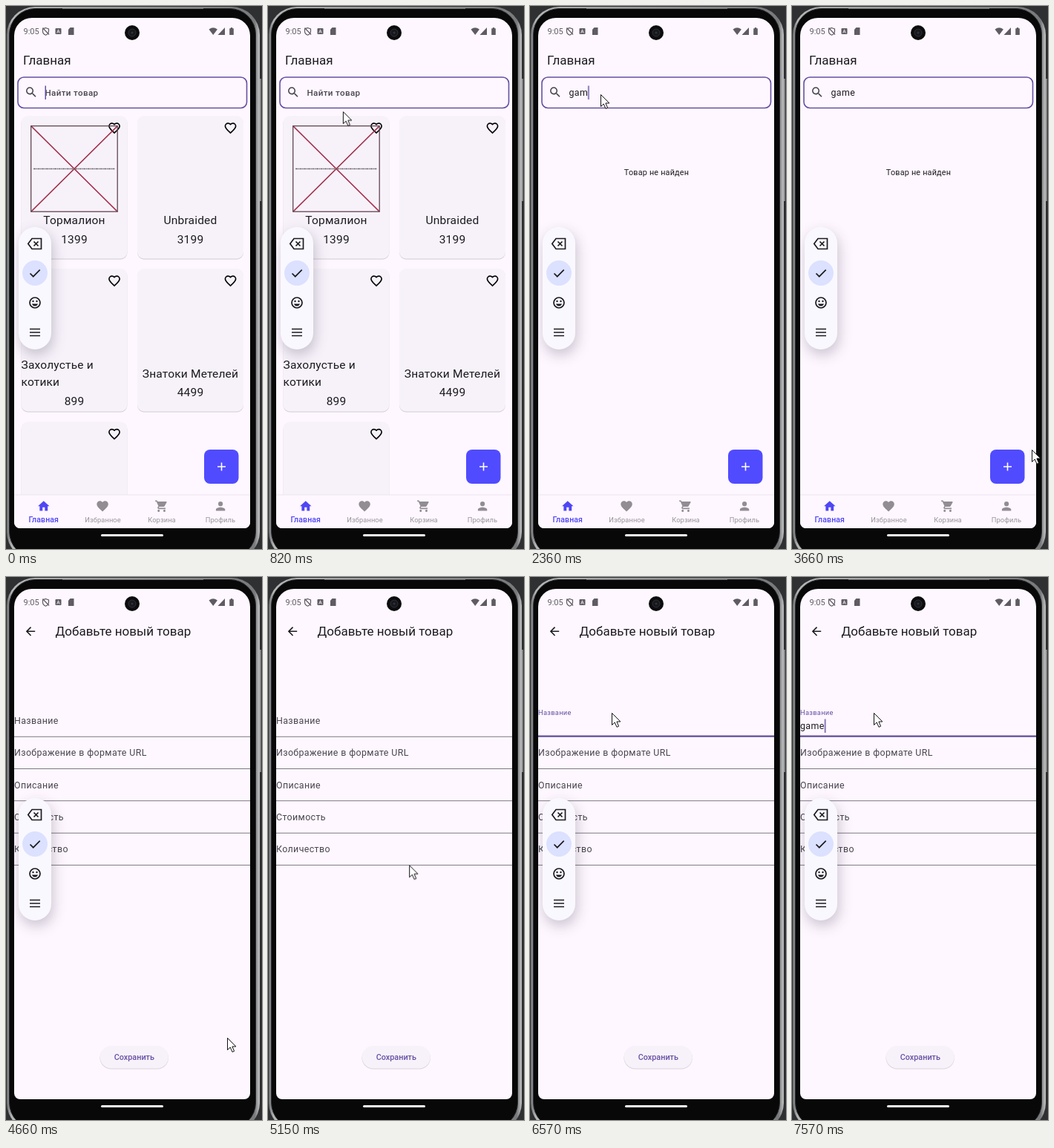
An HTML page that plays this animation: 345x732 px, repeating every 8000 ms.

```html
<!DOCTYPE html>
<html lang="ru">
<head>
<meta charset="utf-8">
<title>Главная</title>
<style>
html, body { margin: 0; width: 100%; height: 100%; overflow: hidden; background: #2b2b2c; }
svg { display: block; width: 100%; height: 100%; }
text { font-family: Roboto, sans-serif; fill: #1d1b20; }
.mid { text-anchor: middle; }
.title { font-size: 17px; }
.card { font-size: 15.5px; letter-spacing: .19px; }
.body { font-size: 12.4px; letter-spacing: .39px; }
.label { fill: #49454f; }
.hint { font-size: 11.6px; font-weight: 500; letter-spacing: .35px; fill: #49454f; }
.note { font-size: 10.84px; letter-spacing: .19px; }
.nav { font-size: 9.3px; letter-spacing: .1px; fill: #98949a; }
.nav.on { font-size: 10.5px; font-weight: 500; fill: #4f46f5; }
.button { font-size: 10.84px; font-weight: 500; fill: #6750a4; }
.line { fill: none; stroke: #1b1b1f; stroke-width: 1.7; }

/* Every track lasts 8 s: 1% = 80 ms */
.step, .step-text tspan { animation: 8s step-end infinite; }
.move { animation: 8s linear infinite; }

.page-list { animation-name: page-list; }
.page-form { animation-name: page-form; }
@keyframes page-list { 0% { opacity: 1 } 58.25%, 100% { opacity: 0 } }
@keyframes page-form { 0% { opacity: 0 } 58.25%, 100% { opacity: 1 } }

.hint { animation-name: hint; }
.goods { animation-name: goods; }
.empty { animation-name: empty; }
@keyframes hint { 0% { opacity: 1 } 26.125%, 100% { opacity: 0 } }
@keyframes goods { 0% { opacity: 1 } 27%, 100% { opacity: 0 } }
@keyframes empty { 0% { opacity: 0 } 27%, 100% { opacity: 1 } }

.query tspan:nth-child(1) { animation-name: q1; }
.query tspan:nth-child(2) { animation-name: q2; }
.query tspan:nth-child(3) { animation-name: q3; }
.query tspan:nth-child(4) { animation-name: q4; }
@keyframes q1 { 0% { fill: transparent } 26.125%, 100% { fill: #1d1b20 } }
@keyframes q2 { 0% { fill: transparent } 27.875%, 100% { fill: #1d1b20 } }
@keyframes q3 { 0% { fill: transparent } 29.5%, 100% { fill: #1d1b20 } }
@keyframes q4 { 0% { fill: transparent } 34.5%, 100% { fill: #1d1b20 } }

.name tspan:nth-child(1) { animation-name: n1; }
.name tspan:nth-child(2) { animation-name: n2; }
.name tspan:nth-child(3) { animation-name: n3; }
.name tspan:nth-child(4) { animation-name: n4; }
@keyframes n1 { 0% { fill: transparent } 88.125%, 100% { fill: #1d1b20 } }
@keyframes n2 { 0% { fill: transparent } 88.875%, 100% { fill: #1d1b20 } }
@keyframes n3 { 0% { fill: transparent } 93.25%, 100% { fill: #1d1b20 } }
@keyframes n4 { 0% { fill: transparent } 94.625%, 100% { fill: #1d1b20 } }

.caret-query { animation-name: caret-query; }
.caret-name { animation-name: caret-name; }
@keyframes caret-query {
  0%, 13.1% { opacity: 1; transform: none }
  6.875%, 20.375% { opacity: 0; transform: none }
  26.125% { opacity: 1; transform: translateX(7.4px) }
  27.875% { opacity: 1; transform: translateX(14.5px) }
  29.5% { opacity: 1; transform: translateX(25.7px) }
  34.5%, 46.25% { opacity: 1; transform: translateX(32.7px) }
  39.625%, 52.625%, 100% { opacity: 0; transform: translateX(32.7px) }
}
@keyframes caret-name {
  0%, 78.625% { opacity: 0; transform: none }
  74.5%, 84.75% { opacity: 1; transform: none }
  88.125% { opacity: 1; transform: translateX(7.4px) }
  88.875% { opacity: 1; transform: translateX(14.5px) }
  93.25% { opacity: 1; transform: translateX(25.7px) }
  94.625%, 100% { opacity: 1; transform: translateX(32.7px) }
}

.float { animation-name: float; }
.focus-line { animation-name: focus-line; }
@keyframes float {
  0%, 74.1% { transform: translate(11px, 198px); fill: #49454f }
  76.4%, 100% { transform: translate(11px, 186.4px) scale(.75); fill: #6750a4 }
}
@keyframes focus-line { 0%, 74.1% { opacity: 0 } 76.4%, 100% { opacity: 1 } }

.tools { transform-origin: 6px 483px; animation-name: tools; filter: drop-shadow(2px 7px 9px rgba(30, 25, 45, .24)); }
@keyframes tools {
  0%, 59.75% { transform: none; opacity: 1 }
  62.5%, 75.75% { transform: scale(.7); opacity: 0 }
  76.875% { transform: scale(.79); opacity: 1 }
  77.75% { transform: scale(.835); opacity: 1; animation-timing-function: ease-out }
  81%, 100% { transform: none; opacity: 1 }
}

.pointer { animation-name: pointer; }
.pointer-shown { animation-name: pointer-shown; }
.click { animation-name: click; }
@keyframes pointer {
  0%, 2.4% { transform: translate(310px, 647px); animation-timing-function: cubic-bezier(.3, .2, .4, 1) }
  12% { transform: translate(95px, 128px) }
  13.6%, 42.9% { transform: translate(95px, 119px) }
  45.6%, 46.6% { transform: translate(323px, 598px); animation-timing-function: ease-in-out }
  53.25%, 59.4% { transform: translate(298px, 621px); animation-timing-function: cubic-bezier(.4, 0, .8, .9) }
  64.4% { transform: translate(190px, 388px) }
  67.75%, 100% { transform: translate(110px, 183px) }
}
@keyframes pointer-shown { 0% { opacity: 0 } 2.5%, 100% { opacity: 1 } }
@keyframes click {
  0%, 17.125%, 58.25%, 71.125%, 100% { opacity: 0 }
  15.375%, 54.875%, 69.375% { opacity: 1 }
}
</style>
</head>
<body>
<svg viewBox="0 0 345 732" preserveAspectRatio="none">
<defs>
  <path id="heart" d="M12 21.35l-1.45-1.32C5.4 15.36 2 12.28 2 8.5 2 5.42 4.42 3 7.5 3c1.74 0 3.41.81 4.5 2.09C13.09 3.81 14.76 3 16.5 3 19.58 3 22 5.42 22 8.5c0 3.78-3.4 6.86-8.55 11.54z"/>
  <g id="card">
    <rect y="1.2" width="143" height="192.5" rx="9" fill="#d9d4dc"/>
    <rect width="143" height="192.4" rx="9" fill="#f7f2fa"/>
    <use href="#heart" transform="translate(117 8) scale(.71)" fill="none" stroke="#000" stroke-width="2.3"/>
  </g>
  <linearGradient id="metal">
    <stop offset="0" stop-color="#6d6f70"/><stop offset=".02" stop-color="#b4b6b6"/>
    <stop offset=".98" stop-color="#77797a"/><stop offset="1" stop-color="#c2c4c4"/>
  </linearGradient>
  <clipPath id="screen"><path d="M11 40a24 24 0 0 1 24-24H305a24 24 0 0 1 24 24V696a8 8 0 0 1-8 8H19a8 8 0 0 1-8-8z"/></clipPath>
</defs>

<!-- Phone body -->
<rect width="345" height="732" fill="#2f3031"/>
<rect x="341" y="98" width="3" height="165" fill="#858788"/>
<rect x="1" y="1" width="341" height="746" rx="38" fill="url(#metal)"/>
<rect x="4.500" y="3.500" width="332" height="740" rx="35" fill="#080809" stroke="#27292a"/>
<path d="M76 3.500H266" stroke="#77797a"/>
<rect x="128" y="712" width="84" height="3" rx="1.500" fill="#f4f4f4"/>

<g clip-path="url(#screen)">
  <rect x="11" y="16" width="318" height="688" fill="#fef7ff"/>

  <g class="step page-list">
    <text class="title" x="23" y="79">Главная</text>
    <rect x="16" y="96" width="308.500" height="41.500" rx="8" fill="none" stroke="#6750a4" stroke-width="1.600"/>
    <path transform="translate(24.700 107) scale(.774)" fill="#49454f" d="M15.500 14h-.79l-.28-.27A6.470 6.470 0 0 0 16 9.500 6.500 6.500 0 1 0 9.500 16c1.610 0 3.090-.59 4.230-1.570l.27.28v.79l5 4.990L20.490 19zm-6 0C7.010 14 5 11.990 5 9.500S7.010 5 9.500 5 14 7.010 14 9.500 11.990 14 9.500 14z"/>
    <text class="hint step" x="52.500" y="121">Найти товар</text>
    <text class="body query step-text" x="52.500" y="120.500"><tspan>g</tspan><tspan>a</tspan><tspan>m</tspan><tspan>e</tspan></text>
    <rect class="step caret-query" x="52.500" y="107.500" width="1.500" height="18.500" fill="#6750a4"/>

    <g class="step goods">
      <use href="#card" x="20.500" y="148"/>
      <use href="#card" x="177" y="148"/>
      <use href="#card" x="20.500" y="354"/>
      <use href="#card" x="177" y="354"/>
      <use href="#card" x="20.500" y="560.500"/>
      <g fill="none">
        <path d="M34 162L150 277M150 162L34 277" stroke="#a52c48" stroke-width="1.700"/>
        <rect x="33.700" y="161.700" width="116.500" height="115.500" stroke="#624552" stroke-width="1.300"/>
        <path d="M37 219.500H147" stroke="#706a70" stroke-width="1.400" stroke-dasharray="3 .6 1.500 .5"/>
      </g>
      <g class="card mid">
        <text x="92" y="294">Тормалион</text><text x="92" y="320">1399</text>
        <text x="248.500" y="294">Unbraided</text><text x="248.500" y="320">3199</text>
        <text x="92" y="538">899</text>
        <text x="248.500" y="500.500">Знатоки Метелей</text><text x="248.500" y="526">4499</text>
      </g>
      <g class="card">
        <text x="20.500" y="489">Захолустье и</text><text x="20.500" y="511.500">котики</text>
      </g>
    </g>
    <text class="note mid step empty" x="170.500" y="227.500">Товар не найден</text>

    <rect x="11" y="659" width="318" height="46" fill="#fef7ff"/>
    <path d="M11 659H329" stroke="#ebe5ee"/>
    <rect x="267" y="598" width="46.500" height="46" rx="8" fill="#514bff"/>
    <path d="M290.500 615.500v11M285 621h11" stroke="#fff" stroke-width="1.600"/>
    <path transform="translate(41.500 665) scale(.774)" fill="#4f46f5" d="M10 20v-6h4v6h5v-8h3L12 3 2 12h3v8z"/>
    <g fill="#918d93">
      <use href="#heart" transform="translate(120.800 665) scale(.774)"/>
      <path transform="translate(200.300 665) scale(.774)" d="M7 18c-1.100 0-2 .9-2 2s.9 2 2 2 2-.9 2-2-.9-2-2-2zM1 2v2h2l3.600 7.590-1.350 2.450C4.500 15.400 5.500 17 7 17h12v-2H7.420c-.2 0-.3-.2-.22-.37l.9-1.630h7.450c.75 0 1.410-.41 1.750-1.030l3.580-6.490A1 1 0 0 0 20 4H5.210l-.94-2zM17 18c-1.100 0-2 .9-2 2s.9 2 2 2 2-.9 2-2-.9-2-2-2z"/>
      <path transform="translate(279.800 665) scale(.774)" d="M12 12a4 4 0 1 0 0-8 4 4 0 0 0 0 8zm0 2c-2.670 0-8 1.340-8 4v2h16v-2c0-2.660-5.330-4-8-4z"/>
    </g>
    <g class="mid">
      <text class="nav on" x="50.700" y="695.500">Главная</text>
      <text class="nav" x="130.500" y="695.500">Избранное</text>
      <text class="nav" x="210" y="695.500">Корзина</text>
      <text class="nav" x="289" y="695.500">Профиль</text>
    </g>
  </g>

  <g class="step page-form">
    <path transform="translate(23.700 64) scale(.774)" fill="#1d1b20" d="M20 11H7.830l5.590-5.590L12 4l-8 8 8 8 1.410-1.410L7.830 13H20z"/>
    <text class="title" x="66.500" y="79">Добавьте новый товар</text>
    <path d="M11 215.300H329M11 258.500H329M11 301.700H329M11 345.200H329M11 388.400H329" stroke="#7d7883" fill="none"/>
    <path class="move focus-line" d="M11 214.500H329" stroke="#6750a4" stroke-width="1.800"/>
    <text class="body move float">Название</text>
    <g class="body">
      <text class="label" x="11" y="241">Изображение в формате URL</text>
      <text class="label" x="11" y="284.500">Описание</text>
      <text class="label" x="11" y="328">Стоимость</text>
      <text class="label" x="11" y="371">Количество</text>
    </g>
    <text class="body name step-text" x="11" y="204.500"><tspan>g</tspan><tspan>a</tspan><tspan>m</tspan><tspan>e</tspan></text>
    <rect class="step caret-name" x="11.200" y="191.500" width="1.500" height="18.500" fill="#6750a4"/>
    <rect x="126.500" y="633" width="92.500" height="30.500" rx="15.200" fill="#dad5dd"/>
    <rect x="126.800" y="632" width="92" height="30.500" rx="15.200" fill="#f7f2fa"/>
    <text class="button mid" x="172.800" y="651">Сохранить</text>
  </g>

  <!-- Status bar -->
  <g fill="#5f5b62">
    <text x="23.500" y="38" font-size="11" style="fill:#5f5b62">9:05</text>
    <path d="M53.500 29.500l4 1.500v3c0 2.500-1.700 4.400-4 5.200-2.300-.8-4-2.700-4-5.200v-3zM49.500 29.500l8.500 9" fill="none" stroke="#5f5b62" stroke-width="1.200"/>
    <rect x="66.500" y="30" width="8" height="8" rx="1"/>
    <path d="M68.700 36.500l1.800-4.700 1.800 4.700M69.300 35h2.400" fill="none" stroke="#fef7ff" stroke-width=".8"/>
    <path d="M86.500 29h5v10h-7.500v-7.300z"/>
    <path d="M273.500 31.500q5.700-4.500 11.400 0L279.200 39z"/>
    <path d="M295 29v10h-9.500z"/>
    <path d="M302.800 29h2.400v1.200h1.600V39h-5.600v-8.800h1.600z"/>
  </g>
  <circle cx="170" cy="36" r="10" fill="#0c0c0e"/>
  <circle cx="170" cy="36" r="5" fill="#17181c" stroke="#303138"/>
  <circle cx="170" cy="36" r="1.600" fill="#30323e"/>

  <g class="move tools">
    <rect x="17" y="298" width="44" height="165" rx="22" fill="#faf8ff"/>
    <circle cx="39" cy="360" r="17" fill="#dbe1ff"/>
    <g class="line">
      <path d="M35 313.500H47.500v14H35l-5.200-7zM37.500 317.500l6 6M43.500 317.500l-6 6"/>
      <path d="M32.500 360.500l4.200 4.200 9-9"/>
      <circle cx="39" cy="400" r="7"/>
      <path d="M32 435.500h14M32 440h14M32 444.500h14"/>
    </g>
    <g fill="#1b1b1f">
      <circle cx="36.500" cy="398" r="1.200"/><circle cx="41.500" cy="398" r="1.200"/>
      <path d="M35 401.500h8a4.200 4.200 0 0 1-8 0z"/>
    </g>
  </g>
</g>

<g class="step pointer-shown">
  <g class="move pointer">
    <circle class="step click" r="15" fill="#ff0" fill-opacity=".47"/>
    <path d="M.5.500v16l3.700-3.500 2.800 6.300 2.600-1.100-2.700-6.200h5z" fill="#fff" stroke="#111"/>
  </g>
</g>
</svg>
</body>
</html>
```
